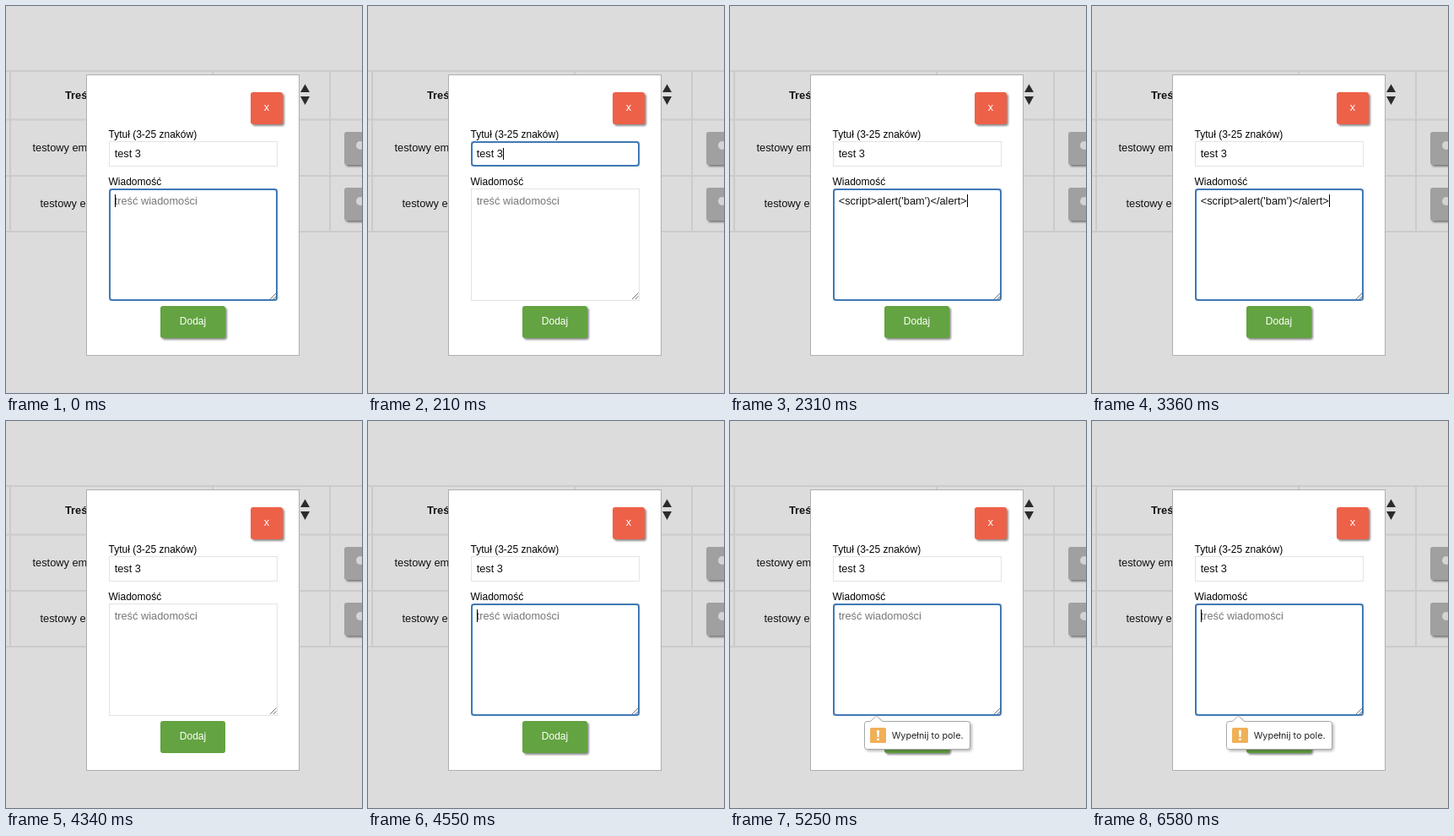
Animation of 422 by 458 pixels, one loop 7 s. Source, as an HTML page:

```html
<!DOCTYPE html>
<html lang="pl">
<head>
<meta charset="utf-8">
<title>Formularz wiadomości</title>
<style>
  html, body { margin: 0; width: 100%; height: 100%; overflow: hidden; background: #dcdcdc; }
  svg { display: block; width: 422px; height: 458px; }
  text { font: 12.8px "Liberation Sans", Arial, sans-serif; fill: #111; white-space: pre; }
  .label { font-size: 12px; fill: #000; }
  .white { fill: #fff; text-anchor: middle; }
  .bold { font-weight: bold; }
  .hint { fill: #777; }
  .tip { font: 10.8px Inter, Roboto, sans-serif; fill: #222; }
  .raised { filter: drop-shadow(2px 2px 1.3px rgba(0, 0, 0, .45)); }
  .field { fill: #fff; stroke: #e3e3e3; }
  .ring { fill: #fff; stroke: #4078b5; stroke-width: 2; }
  .bubble { filter: drop-shadow(2px 2px 1.5px rgba(0, 0, 0, .25)); }
</style>
</head>
<body>
<svg viewBox="0 0 422 458">
  <rect width="422" height="458" fill="#dcdcdc"/>
  <path d="M0 77H422M0 134.5H422M0 201H422M0 267H422M5 77V267M245 77V267M384 77V267"
        stroke="#cbcbcb" stroke-width="2"/>
  <text class="bold" x="70" y="110">Treść</text>
  <text x="31.5" y="172">testowy email</text>
  <text x="40.5" y="238">testowy email</text>
  <path d="M349 102L354.5 92.5L360 102ZM349 107H360L354.5 117Z" fill="#2b2b2b"/>
  <g class="raised" fill="#a0a0a0">
    <rect x="401" y="149" width="40" height="39" rx="3"/>
    <rect x="401" y="215" width="40" height="39" rx="3"/>
  </g>
  <g fill="#d4d4d4">
    <circle cx="420" cy="165" r="5"/>
    <circle cx="420" cy="231" r="5"/>
  </g>

  <rect x="95.5" y="81.5" width="252" height="332" fill="#fff" stroke="#b0b0b0"/>
  <rect class="raised" x="290" y="102" width="38" height="38" rx="3" fill="#ed6148"/>
  <text class="white" x="309" y="124">x</text>

  <text class="label" x="121.5" y="156">Tytuł (3-25 znaków)</text>
  <rect class="field" x="122.5" y="160.5" width="199" height="29"/>
  <rect id="titleRing" class="ring" x="123" y="161" width="198" height="28" rx="3"/>
  <text x="128.7" y="179" fill="#000">test 3</text>

  <text class="label" x="121.5" y="212">Wiadomość</text>
  <rect class="field" x="122.5" y="216.5" width="199" height="132"/>
  <rect id="bodyRing" class="ring" x="123" y="217" width="198" height="131" rx="3"/>
  <path d="M313 347L320.5 339.5M317 347L320.5 343.5" stroke="#666" stroke-width=".9"/>
  <text id="body" x="128.7" y="235"></text>
  <rect id="caret" width="1" fill="#000"/>

  <rect id="send" x="183" y="355" width="77" height="38" rx="3" fill="#63a341"/>
  <text class="label white" style="fill:#fff" x="221.5" y="377">Dodaj</text>

  <g id="tip">
    <path class="bubble" fill="#fff" stroke="#a6a6a6"
          d="M162.5 355.5H166.5L173.5 349L180.5 355.5H281.5Q284.5 355.5 284.5 358.5V385.5Q284.5 388.5 281.5 388.5H162.5Q159.5 388.5 159.5 385.5V358.5Q159.5 355.5 162.5 355.5Z"/>
    <rect x="166" y="363" width="19" height="18" rx="1.5" fill="#f0b058"/>
    <path d="M174 366H177L176.5 374H174.5ZM174.3 375.5H176.7V378H174.3Z" fill="#fff"/>
    <text class="tip" x="191.7" y="376">Wypełnij to pole.</text>
  </g>
</svg>
<script>
  const LOOP = 7000, STEP = 70;
  const TITLE = 70, BODY = 1050, PASTE = 2310, PRESS = 4340, REJECT = 4480, TIP = 4550;
  const code = "<script>alert('bam')<" + "/alert>";
  const hint = "treść wiadomości";
  // spans [from, to) in which the caret is hidden
  const hidden = [[770, 1050], [1610, 2100], [2870, 3360], [3920, REJECT], [4970, 5530], [6020, 6580]];
  const $ = id => document.getElementById(id);
  const within = (t, a, b) => t >= a && t < b;
  const show = (el, on) => el.setAttribute("visibility", on ? "visible" : "hidden");

  const titleRing = $("titleRing"), bodyRing = $("bodyRing"), body = $("body");
  const caret = $("caret"), send = $("send"), tip = $("tip");

  function placeCaret(x, y, h) {
    caret.setAttribute("x", x);
    caret.setAttribute("y", y);
    caret.setAttribute("height", h);
  }

  function draw(now) {
    const t = Math.floor(now % LOOP / STEP) * STEP;
    const inTitle = within(t, TITLE, BODY);
    const pressed = within(t, PRESS, REJECT);
    const filled = within(t, PASTE, PRESS);

    show(titleRing, inTitle);
    show(bodyRing, !inTitle && !pressed);
    body.textContent = filled ? code : hint;
    body.setAttribute("class", filled ? "" : "hint");
    send.setAttribute("class", pressed ? "" : "raised");

    show(caret, !hidden.some(([a, b]) => within(t, a, b)));
    if (inTitle) placeCaret(160, 168, 14);
    else placeCaret(filled ? 281 : 129, 223, 15);

    // the bubble grows out of its arrow tip while fading in
    const age = t - TIP;
    show(tip, age >= 0);
    if (age >= 0) {
      const scale = age > 560 ? 1 : 1 - 0.6 * Math.exp(-age / 55);
      tip.setAttribute("opacity", age > 560 ? 1 : 1 - Math.exp(-age / 80));
      tip.setAttribute("transform", `translate(173.5 349) scale(${scale}) translate(-173.5 -349)`);
    }
  }

  const start = performance.now();
  function tick() {
    draw(performance.now() - start);
    requestAnimationFrame(tick);
  }
  tick();
</script>
</body>
</html>
```
